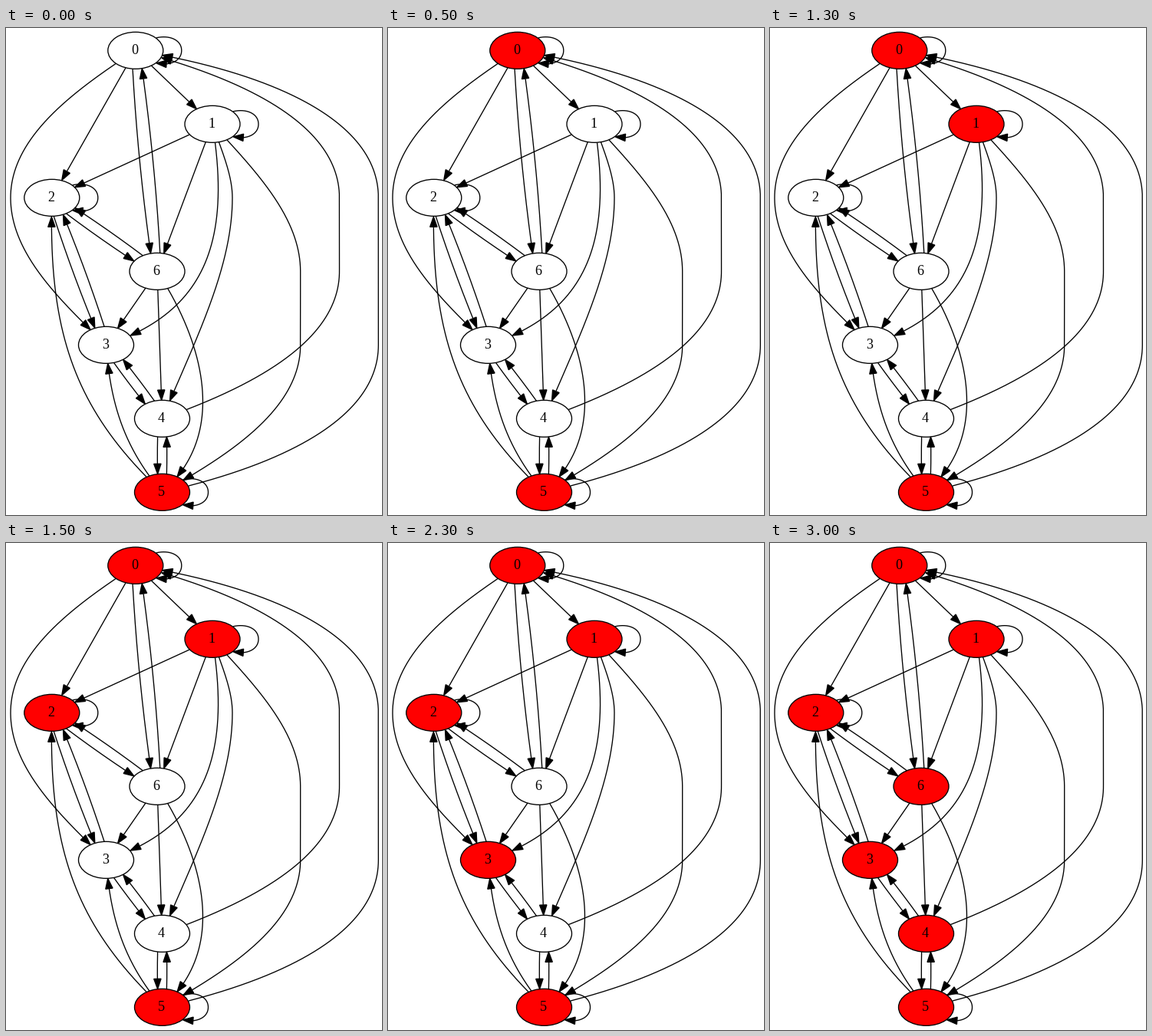
Write a matplotlib script that moves like this. It is 490 by 635 pixels and loops after 3.5 s.

```python
import numpy as np
import matplotlib.pyplot as plt
from matplotlib.animation import FuncAnimation
from matplotlib.patches import Ellipse, Polygon

W, H, DPI = 490, 635, 100
PX = 72 / DPI                 # points per pixel
LINE = 4 / 3 * PX
RX, RY = 36, 24               # node radii
HEAD, HALF = 13.3, 4.67       # arrowhead length and half width
SIDE = 5                      # sideways shift of opposite edges

fig = plt.figure(figsize=(W / DPI, H / DPI), dpi=DPI, facecolor="white")
ax = fig.add_axes([0, 0, 1, 1])
ax.set_xlim(0, W)
ax.set_ylim(H, 0)
ax.axis("off")

# Nodes from top to bottom, one per rank
ranks = {0: 168.8, 1: 269, 2: 59.8, 6: 197, 3: 130.5, 4: 203.5, 5: 203.5}
center = {n: np.array([x, 29.33 + 96 * k]) for k, (n, x) in enumerate(ranks.items())}
visit_order = [5, 0, 1, 2, 3, 4, 6]


def make_node(n):
    x, y = center[n]
    ax.text(x - 1, y + 5, str(n), family="Liberation Serif", size=18.2 * PX,
            ha="center", va="baseline", zorder=3)
    shape = Ellipse((x, y), 2 * RX, 2 * RY, fc="white", ec="black", lw=LINE, zorder=1)
    return ax.add_patch(shape)


def bezier(*pts):
    p = np.array(pts, float)
    t = np.linspace(0, 1, 600)[:, None]
    s = 1 - t
    return s**3 * p[0] + 3 * s * s * t * p[1] + 3 * s * t * t * p[2] + t**3 * p[3]


def outside(path, n):
    d = (path - center[n]) / (RX, RY)
    return np.hypot(d[:, 0], d[:, 1]) >= 1


def draw_arrow(path, a, b):
    """Trim the path at both nodes and end it with an arrowhead."""
    path = path[outside(path, a) & outside(path, b)]
    tip = path[-1]
    shaft = path[np.hypot(*(path - tip).T) >= HEAD]
    ax.plot(*shaft.T, color="black", lw=LINE, solid_capstyle="butt", zorder=2)
    d = (tip - shaft[-1]) / np.hypot(*(tip - shaft[-1]))
    back = tip - HEAD * d
    wing = HALF * np.array([-d[1], d[0]])
    ax.add_patch(Polygon([tip, back + wing, back - wing], fc="black", ec="black",
                         lw=LINE, joinstyle="miter", zorder=2))


def straight(a, b, side=0):
    """Centre line, or a slightly bowed line on the right of travel."""
    p, q = center[a], center[b]
    d = q - p
    length = np.hypot(*d)
    right = np.array([-d[1], d[0]]) / length
    shift = side * right
    bow = shift + (length / 60 * right if side else 0)
    draw_arrow(bezier(p + shift, p + d / 3 + bow, q - d / 3 + bow, q + shift), a, b)


def bend(a, b, h1, h2):
    draw_arrow(bezier(center[a], h1, h2, center[b]), a, b)


def sweep(p, v):
    """Curve from a node centre that joins a vertical lane at v."""
    dx, dy = v - p
    ratio = abs(dx / dy)
    near = p + (dx / 2, dy * (0.43 - 0.18 * ratio))
    far = v - (0, dy * (0.25 + 0.19 * ratio))
    return bezier(p, near, far, v)


def lane(a, b, x, first, last):
    """Leave a, run down the lane between two ranks, then enter b."""
    enter, leave = (np.array([x, center[n][1]]) for n in (first, last))
    path = np.vstack([sweep(center[a], enter),
                      np.linspace(enter, leave, 100),
                      sweep(center[b], leave)[::-1]])
    draw_arrow(path, a, b)


def loop(n):
    half = bezier((27, -16.5), (44, -20.5), (60, -14), (60, 0))
    draw_arrow(center[n] + np.vstack([half, half[::-1] * (1, -1)]), n, n)


nodes = {n: make_node(n) for n in center}

for n in (0, 1, 2, 5):
    loop(n)
for a, b in [(0, 1), (0, 2), (1, 2), (1, 6), (6, 3), (6, 4)]:
    straight(a, b)
for a, b in [(0, 6), (2, 6), (2, 3), (3, 4), (4, 5)]:
    straight(a, b, SIDE)
    straight(b, a, SIDE)

lane(0, 3, 6, 2, 2)
lane(1, 4, 295, 2, 2)
lane(1, 5, 383.7, 6, 3)
lane(4, 0, 434.5, 6, 2)
lane(5, 0, 485.3, 3, 2)

bend(1, 3, (295, 285), (255, 372))
bend(5, 2, (88, 497), (55, 395))
bend(5, 3, (155, 548), (136, 492))
bend(6, 5, (258, 410), (290, 530))


def update(step):
    visited = visit_order[:step + 1]
    for n, shape in nodes.items():
        shape.set_facecolor("red" if n in visited else "white")
    return list(nodes.values())


anim = FuncAnimation(fig, update, frames=len(visit_order), interval=500,
                     repeat=True, repeat_delay=0, blit=False)
plt.show()
```
